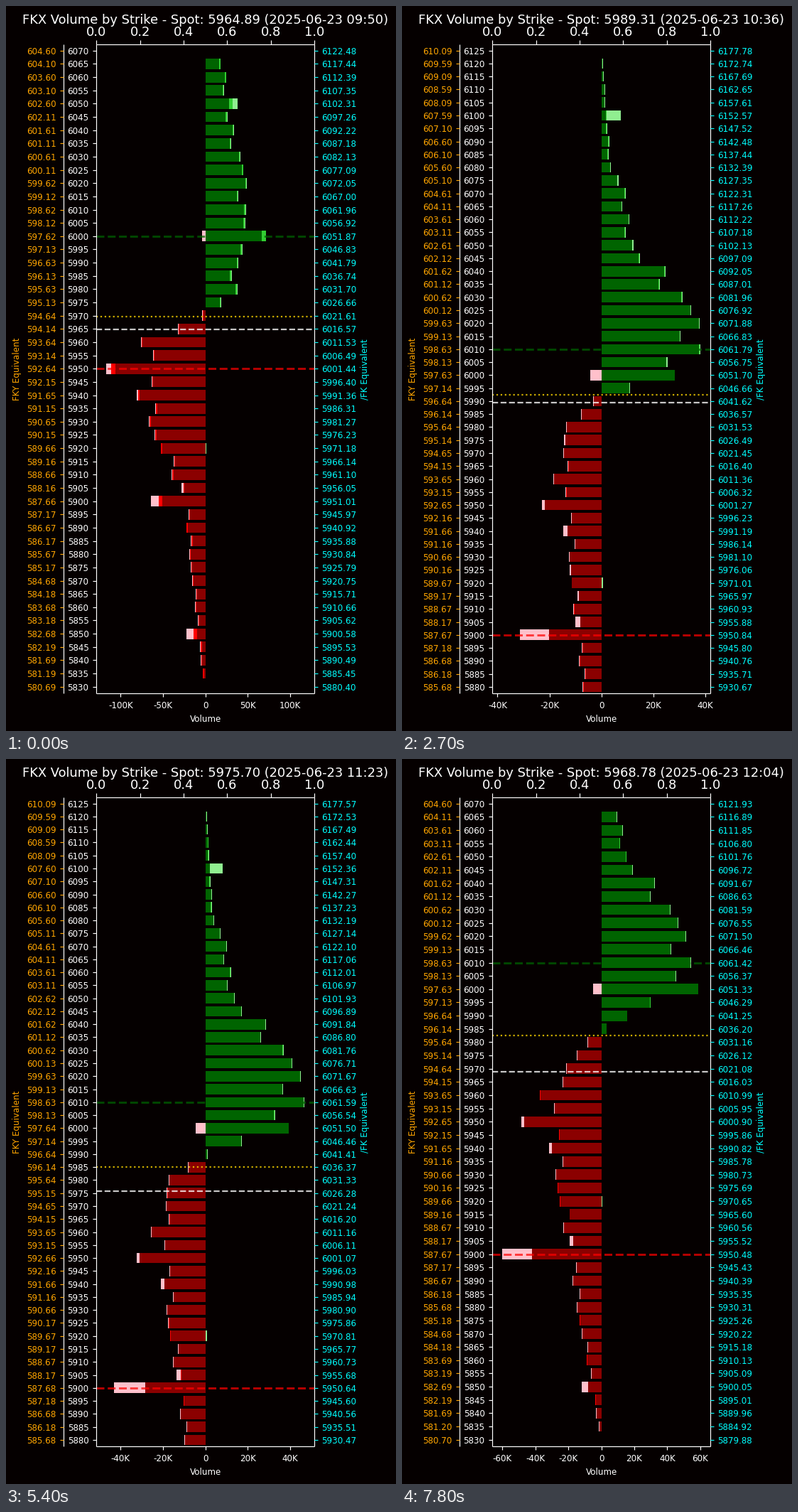
These frames come from a looping animation (549 px wide and 1020 px high, 8 s). A matplotlib script:

```python
import numpy as np
import matplotlib.pyplot as plt
from matplotlib.animation import FuncAnimation
from matplotlib.collections import LineCollection, PolyCollection

W, H, DPI = 549, 1020, 96
PT = 107 / DPI                      # point scale of the chart
L, R, T, B = 127.2, 433.9, 53.5, 967
MID, HALF = (L + R) / 2, (R - L) / 2
OUTER, TICK, PAD = 81.3, 5.2, 10.6
STEPS, SETTLE = 27, 4               # the opening profile fades by SETTLE
STRIKES = np.arange(5830, 6130, 5)
COLORS = [("darkgreen", "darkred"), ("limegreen", "red"), ("lightgreen", "pink")]

# Key points of the price levels and of the two conversion ratios
KEYS = [0, 4, 7, 12, 18, 21, 26]
SPOT = [5964.89, 5998.66, 5993.22, 5983.45, 5975.70, 5951.07, 5968.78]
FLIP = [5969.6, 5984, 5992.6, 5992.5, 5985.1, 5984, 5982.4]
ETF = .0996 + 1e-6 * np.array([4, 5, 8.68, 1.3, 6, 9.5, 5.2])
FUT = 1.008 + 1e-6 * np.array([645.7, 611.1, 651.6, 565.75, 583.2, 623.8, 555.3])

# Net volume in thousands over the strikes: opening, settled, final
KNOTS = [5830, 5900, 5940, 5960, 5970, 5980, 5990, 6000,
         6010, 6020, 6040, 6050, 6070, 6080, 6125]
OPENING, SETTLED, FINAL = (np.interp(STRIKES, KNOTS, v) for v in (
    [0, -24, -78, -74, -2, 36, 37, 67, 46, 47, 32, 28, 18, 4, 0],
    [0, -9, -12, -17, -12, -5.5, .5, 27, 33, 33.6, 22, 11, 8.5, 3.2, 0],
    [0, -20, -30, -37, -21, -8, 15.5, 58.7, 54, 51, 32, 15, 10.5, 4, 0]))

# Large light blocks (settled, final); negative ones face the other way
BLOCKS = {6100: (5.4, 6.4), 6000: (-4.1, -4.9), 5950: (1, 1.5), 5940: (1.6, 1.8),
          5920: (-.8, -.6), 5905: (1.9, 2.1), 5900: (9, 18), 5850: (3.5, 3.8)}


def volumes_at(step):
    """Rows of (dark, mid, light) volume for every strike."""
    early = max(0, 1 - step / SETTLE)
    u = max(0, (step - SETTLE) / (STEPS - 1 - SETTLE))
    grow = np.where(STRIKES > 6005, u, u ** 2)
    dark = early * OPENING + (1 - early) * (SETTLED + grow * (FINAL - SETTLED))
    dark -= 12 * np.sin(np.pi * u) * np.exp(-((STRIKES - 5982) / 10) ** 2)

    # round strikes trade more, above all among the puts
    minor = (STRIKES % 10 == 5) & (STRIKES % 25 != 0)
    dark *= np.where(minor, .8, 1)
    fifty, hundred = STRIKES % 100 == 50, STRIKES % 100 == 0
    dark *= np.where(dark < 0, 1 + .4 * fifty + 1.1 * hundred, 1)

    mid = .1 + early * np.where(fifty | hundred, 4.5, 1.2)
    light = np.full(len(STRIKES), .3 + .4 * early)
    for strike, (first, last) in BLOCKS.items():
        light[STRIKES == strike] = first + u * (last - first)
    light += 5 * early * fifty
    side = np.sign(dark)
    return np.column_stack([dark, side * mid, side * light])


def tick_step(span):
    for base in (1, 10, 100):
        for m in (1, 2, 2.5, 5):
            if span / (m * base) <= 8:
                return m * base
    return 1000


fig = plt.figure(figsize=(W / DPI, H / DPI), dpi=DPI, facecolor="#050000")
ax = fig.add_axes([0, 0, 1, 1])
ax.set(xlim=(0, W), ylim=(H, 0))
ax.axis("off")


def label(x, y, s="", size=8, color="white", ha="center", va="baseline", **kw):
    return ax.text(x, y, s, size=size * PT, color=color, ha=ha, va=va, **kw)


def segments(color="white"):
    lines = LineCollection([], colors=color, linewidths=.8 * PT, zorder=4)
    return ax.add_collection(lines, autolim=False)


def level(color, style, width, alpha):
    return ax.plot([L, R], [0, 0], style, color=color, lw=width * PT,
                   alpha=alpha, zorder=3, scalex=False, scaley=False)[0]


bars = {}
for pair in COLORS:
    for color in pair:
        bars[color] = ax.add_collection(
            PolyCollection([], facecolors=color, edgecolors="none", zorder=2),
            autolim=False)

call_line = level("darkgreen", "--", 2, .7)
put_line = level("red", "--", 2, .7)
spot_line = level("white", "--", 1.5, .78)
flip_line = level("gold", ":", 1.5, .8)

title = label(MID, 24.6, size=12)
label(MID, 1007, "Volume")
label(15.5, 511, "FKY Equivalent", color="orange", va="center", rotation=90)
label(505, 511, "/FK Equivalent", color="cyan", va="center", rotation=90)

frame = [[(L, T), (R, T)], [(L, B), (R, B)], [(L, T), (L, B)],
         [(R, T), (R, B)], [(OUTER, T), (OUTER, B)]]
for i in range(6):
    x = L + (R - L) * i / 5
    label(x, 42, f"{i / 5:.1f}", size=12)
    frame.append([(x, T - TICK), (x, T)])
segments().set_segments(frame)

x_labels = [label(0, 988.5) for _ in range(9)]
x_ticks = segments()
# tick start, label edge, colour, alignment
SCALES = [(OUTER - TICK, OUTER - PAD, "orange", "right"),
          (L - TICK, L - PAD, "white", "right"),
          (R, R + PAD, "cyan", "left")]
y_labels = [[label(x, 0, color=c, ha=ha, va="center_baseline")
             for _ in range(50)] for _, x, c, ha in SCALES]
y_ticks = [segments(c) for _, _, c, _ in SCALES]


def draw_bars(strikes, vol, y_of, scale):
    half = 2 * (y_of(0) - y_of(1))
    ends = {1: np.zeros(len(strikes)), -1: np.zeros(len(strikes))}
    for layer, pair in enumerate(COLORS):
        for side, color in zip((1, -1), pair):
            start = ends[side]
            stop = start + np.where(vol[:, layer] * side > 0, vol[:, layer], 0)
            ends[side] = stop
            verts = []
            for s, a, b in zip(strikes, start, stop):
                if a != b:
                    x0, x1, y = MID + a * scale, MID + b * scale, y_of(s)
                    verts.append([(x0, y - half), (x1, y - half),
                                  (x1, y + half), (x0, y + half)])
            bars[color].set_verts(verts)


def update(i):
    step = min(i // 3, STEPS - 1)
    spot, flip, etf, fut = (np.interp(step, KEYS, v)
                            for v in (SPOT, FLIP, ETF, FUT))
    minute = 590 + round(5.16 * step)
    title.set_text(f"FKX Volume by Strike - Spot: {spot:.2f} "
                   f"(2025-06-23 {minute // 60:02d}:{minute % 60:02d})")

    lo, hi = (5880, 6125) if spot > 5975 else (5830, 6070)
    shown = (STRIKES >= lo) & (STRIKES <= hi)
    strikes, vol = STRIKES[shown], volumes_at(step)[shown]
    vol[strikes == hi] = vol[strikes == 5830] = 0

    def y_of(s):
        return T + (hi + 2.5 - s) / (hi - lo + 5) * (B - T)

    peak = max(vol.clip(min=0).sum(1).max(), -vol.clip(max=0).sum(1).min())
    limit = 1.1 * peak
    scale = HALF / limit
    draw_bars(strikes, vol, y_of, scale)

    net = vol.sum(1)
    for line, s in ((call_line, strikes[net.argmax()]),
                    (put_line, strikes[net.argmin()]),
                    (spot_line, spot), (flip_line, flip)):
        line.set_ydata([y_of(s)] * 2)

    gap = tick_step(2 * limit)
    marks = []
    for k, text in zip(range(-4, 5), x_labels):
        x = MID + k * gap * scale
        text.set_visible(L <= x <= R)
        text.set_x(x)
        text.set_text(f"{k * gap:.0f}K" if k else "0")
        if L <= x <= R:
            marks.append([(x, B), (x, B + TICK)])
    x_ticks.set_segments(marks)

    for (x, *_), texts, ticks, ratio in zip(SCALES, y_labels, y_ticks,
                                            (etf, 1, fut)):
        for n, text in enumerate(texts):
            text.set_visible(n < len(strikes))
            if n < len(strikes):
                s = strikes[n]
                text.set_y(y_of(s))
                text.set_text(str(s) if ratio == 1 else f"{s * ratio:.2f}")
        ticks.set_segments([[(x, y_of(s)), (x + TICK, y_of(s))]
                            for s in strikes])
    return []


anim = FuncAnimation(fig, update, frames=80, interval=100, repeat=True)
plt.show()
```
